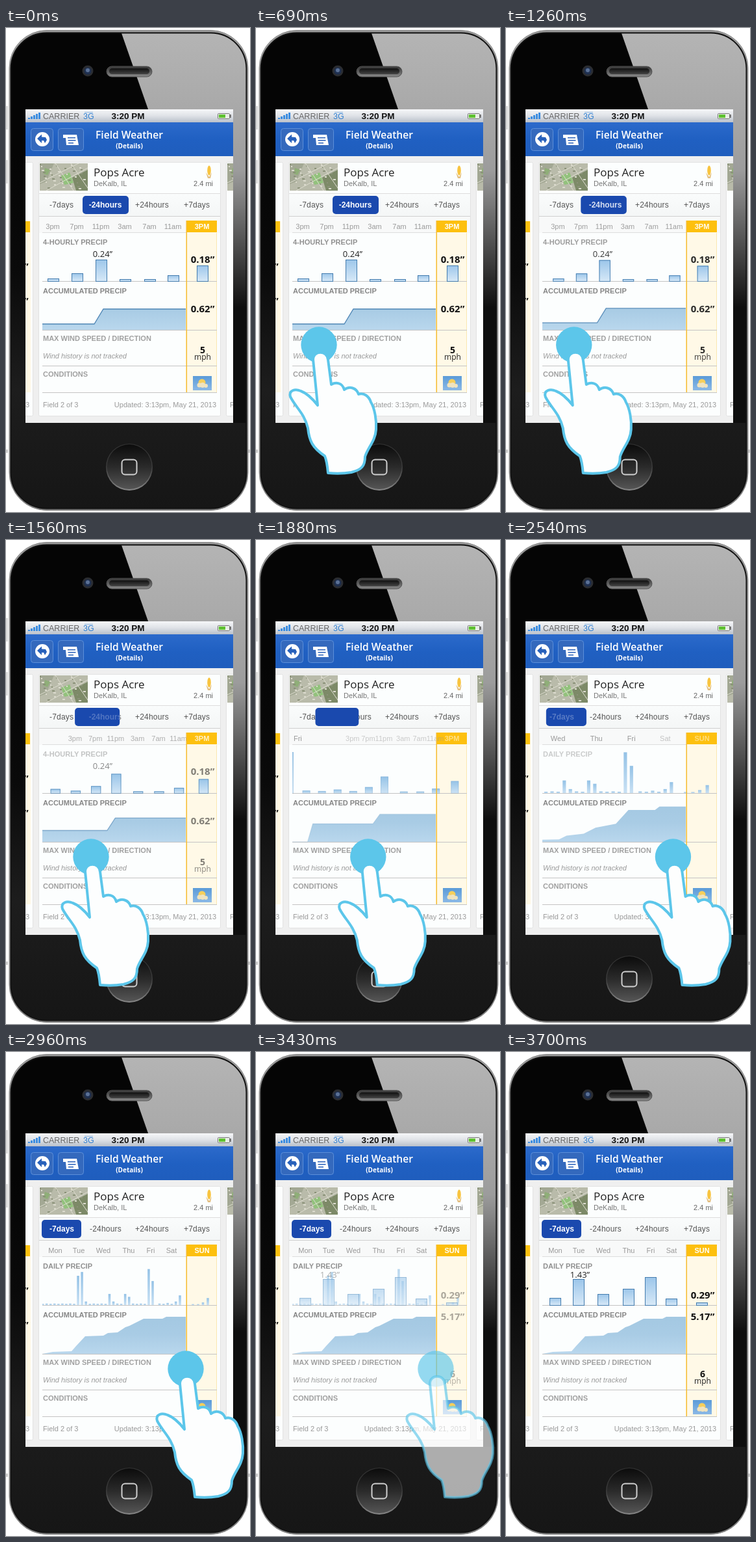
These frames come from a looping animation (376 px wide and 744 px high, 4.22 s). An HTML page with a canvas:

```html
<!DOCTYPE html>
<html lang="en">
<head>
<meta charset="utf-8">
<title>Field Weather</title>
<style>
html, body { margin: 0; width: 100%; height: 100%; overflow: hidden; background: #fff; }
canvas { display: block; width: 376px; height: 744px; }
</style>
</head>
<body>
<canvas id="stage" width="376" height="744"></canvas>
<script>
const ctx = document.getElementById('stage').getContext('2d');
const LOOP = 4220;
const SANS = '"Liberation Sans", Arial, sans-serif';
const OPEN = '"Open Sans", sans-serif';
const BLUE = '#1a49ae', GOLD = '#fdc00f', CYAN = '#5cc6ea';

const clamp = v => Math.max(0, Math.min(1, v));
const lerp = (a, b, k) => a + (b - a) * k;
const span = (t, from, to) => clamp((t - from) / (to - from));

function rect(x, y, w, h, fill) {
  ctx.fillStyle = fill;
  ctx.fillRect(x, y, w, h);
}
function rounded(x, y, w, h, r, fill, stroke, width = 1) {
  ctx.beginPath();
  ctx.roundRect(x, y, w, h, r);
  if (fill) { ctx.fillStyle = fill; ctx.fill(); }
  if (stroke) { ctx.strokeStyle = stroke; ctx.lineWidth = width; ctx.stroke(); }
}
function disc(x, y, r, fill) {
  ctx.beginPath();
  ctx.arc(x, y, r, 0, 7);
  ctx.fillStyle = fill;
  ctx.fill();
}
function poly(points, fill) {
  ctx.beginPath();
  points.forEach(([x, y]) => ctx.lineTo(x, y));
  ctx.fillStyle = fill;
  ctx.fill();
}
function vertical(y0, y1, ...stops) {
  const g = ctx.createLinearGradient(0, y0, 0, y1);
  stops.forEach((c, i) => g.addColorStop(i / (stops.length - 1), c));
  return g;
}
function text(str, x, y, font, color, align = 'left', spacing = 0) {
  ctx.font = font;
  ctx.fillStyle = color;
  ctx.textAlign = align;
  ctx.letterSpacing = spacing + 'px';
  ctx.fillText(str, x, y);
}
function faded(alpha, draw) {
  if (alpha <= 0) return;
  ctx.save();
  ctx.globalAlpha *= clamp(alpha);
  draw();
  ctx.restore();
}
function clipped(x, y, w, h, draw) {
  ctx.save();
  ctx.beginPath();
  ctx.rect(x, y, w, h);
  ctx.clip();
  draw();
  ctx.restore();
}

function phone() {
  rect(0, 0, 376, 744, '#fff');
  for (const y of [120, 203]) rect(0, y, 3, 36, '#dcdcdc');
  for (const x of [0, 373]) rect(x, 648, 3, 5, '#ccc');
  rounded(5, 3.5, 368, 738, 58, vertical(4, 741, '#999', '#ccc', '#aaa', '#777'), '#888');
  rounded(7.5, 7.5, 363, 731, 55, vertical(8, 738, '#050505', '#050505', '#0a0a0a', '#1d1d1d', '#161616'), '#111', 2);
  ctx.save();
  ctx.beginPath();
  ctx.roundRect(8.5, 8.5, 361, 729, 54);
  ctx.clip();
  poly([[178, 8], [219, 125], [350, 607], [376, 607], [376, 8]],
    vertical(8, 430, '#b4b4b4', '#aaa', '#9c9c9c', '#555', '#0e0e0e'));
  ctx.restore();

  disc(126, 66, 8.5, '#2b2d31');
  disc(126, 66, 5.5, '#1f3050');
  disc(126, 65, 3, '#5b7196');
  rounded(155, 59, 70, 16, 8, vertical(59, 75, '#333', '#8a8a8a'), '#555');
  rounded(159, 62, 62, 9, 4.5, vertical(62, 71, '#111', '#444'));

  disc(190, 675, 36, vertical(639, 711, '#333', '#3c3c3c', '#888'));
  disc(190, 674.5, 34.5, vertical(640, 709, '#0c0c0c', '#2a2a2a', '#555'));
  rounded(178.5, 663.5, 23, 23, 5, null, '#cfcfcf', 2);
}

function topBars() {
  rect(30, 125, 320, 20, vertical(125, 145, '#f6f7f9', '#dfe2e7', '#b9c0ca'));
  for (let i = 0; i < 5; i++) rect(34 + i * 4, 138 - i * 2, 3, 2 + i * 2, '#3c8de0');
  text('CARRIER', 57, 140, '12.5px ' + SANS, '#666');
  text('3G', 119, 140, '12.5px ' + SANS, '#2f7fd2');
  rect(121, 129, 13, 1, '#8fb9e4');
  text('3:20 PM', 188, 140, 'bold 13.5px ' + SANS, '#111', 'center');
  rounded(326.5, 131.5, 18, 8, 1, '#e9eee6', '#777');
  rect(328, 133, 10, 5, '#5fc131');
  rect(345, 133, 2, 5, '#777');

  rect(30, 145, 320, 52, vertical(145, 197, '#2c6acb', '#2060c2', '#1f5dbd'));
  for (const [x, w] of [[38.5, 34], [80.5, 39]]) rounded(x, 154.5, w, 34, 4, '#3469bd', '#5c8fd9');
  disc(56, 171, 11, '#fff');
  poly([[48, 170], [55, 163.5], [55, 167.5], [61, 168], [63, 172], [60, 177], [58, 173], [55, 173], [55, 177]], '#2861bb');
  poly([[88, 164], [109, 164], [112, 180], [93, 180], [92, 169], [88, 169]], '#fff');
  for (const y of [168, 172, 176]) rect(95 + (y - 168) / 8, y, y > 172 ? 8 : 12, 1.5, '#2a61b9');
  text('Field Weather', 190, 170, '600 15.6px ' + OPEN, '#fff', 'center');
  text('(Details)', 190, 185, 'bold 10px ' + OPEN, '#fff', 'center');
}

function mapThumb(x) {
  rect(x, 208, 74, 42, '#b9bbaa');
  poly([[x, 208], [x + 22, 208], [x + 10, 236], [x, 240]], '#a3a894');
  poly([[x + 50, 230], [x + 74, 218], [x + 74, 250], [x + 56, 250]], '#7d8a68');
  poly([[x + 33, 227], [x + 46, 222], [x + 52, 238], [x + 38, 241]], '#92c27c');
  poly([[x + 8, 215], [x + 16, 218], [x + 12, 226], [x + 6, 224]], '#8fae78');
  for (let i = 0; i < 38; i++)
    rect(x + i * 29 % 71, 209 + i * 17 % 38, 2 + i % 3, 2, i % 2 ? '#dcdbce' : '#8a9178');
  ctx.strokeStyle = '#dddccf';
  ctx.lineWidth = 1;
  ctx.beginPath();
  for (const [a, b, c, d] of [[0, 238, 60, 208], [24, 208, 52, 250], [48, 208, 74, 246], [10, 250, 74, 215]]) {
    ctx.moveTo(x + a, b);
    ctx.lineTo(x + c, d);
  }
  ctx.stroke();
}

function card() {
  rect(30, 197, 320, 410, '#efefef');
  for (const [x, w] of [[24, 18], [50, 281], [339, 20]])
    clipped(30, 197, 320, 410, () => rounded(x + .5, 206.5, w - 1, 390, 2, '#fcfefe', '#e2e2e2'));
  clipped(341, 208, 9, 42, () => mapThumb(341));
  clipped(52, 208, 74, 42, () => mapThumb(52));

  rect(30, 297, 8, 263, '#fff8e4');
  rect(30, 297, 7, 17, GOLD);
  text('”', 28, 372, 'bold 15px ' + OPEN, '#111');
  text('”', 28, 425, 'bold 15px ' + OPEN, '#111');
  text('3', 30, 583, '11px ' + SANS, '#999');
  clipped(339, 560, 11, 30, () => text('F', 345, 583, '11px ' + SANS, '#999'));

  text('Pops Acre', 135, 228, '17px ' + OPEN, '#222');
  text('DeKalb, IL', 135, 243, '11px ' + SANS, '#777');
  text('2.4 mi', 319, 243, '11px ' + SANS, '#666', 'right');
  ctx.beginPath();
  ctx.ellipse(313, 219, 2.8, 7.5, 0, 0, 7);
  ctx.fillStyle = '#f8c440';
  ctx.fill();
  poly([[308, 222], [313, 229], [317, 222], [315, 231], [311, 231]], '#e3bf80');

  rect(51, 254, 279, 36, vertical(254, 290, '#fafcfc', '#f4f6f6'));
  rect(51, 254, 279, 1, '#ddd');
  rect(51, 289, 279, 1, '#d0d0d0');
  rect(51, 290, 279, 25, '#f8f9f9');
  rect(56, 314, 222, 1, '#ddd');
  rect(278, 297, 47, 263, '#fff9e7');
  rect(324, 315, 1, 245, '#fbe7b0');
  rect(278, 296, 47, 18, GOLD);
  for (const y of [389, 464, 519, 560]) rect(56, y, 269, 1, '#c4c4c4');

  const label = 'bold 11px ' + SANS;
  text('ACCUMULATED PRECIP', 57, 408, label, '#858585');
  text('MAX WIND SPEED / DIRECTION', 57, 481, label, '#a0a0a0');
  text('Wind history is not tracked', 57, 508, 'italic 11px ' + SANS, '#999');
  text('CONDITIONS', 57, 536, label, '#a0a0a0');
  text('Field 2 of 3', 57, 583, '11px ' + SANS, '#999');
  text('Updated: 3:13pm, May 21, 2013', 324, 583, '11px ' + SANS, '#999', 'right');

  rect(288, 535, 29, 22, vertical(535, 557, '#5b9bd8', '#8bb9e6'));
  disc(302, 545, 5.5, '#f6cf5c');
  for (const [x, y, r] of [[298, 549, 3.5], [303, 549, 4], [308, 550, 3]]) disc(x, y, r, '#efe3bf');
}

function tabs(p) {
  const names = [['-7days', 67], ['-24hours', 129], ['+24hours', 199], ['+7days', 274]];
  for (const [name, x] of names) text(name, x, 276, '12px ' + SANS, '#555', 'left', .2);
  rounded(lerp(118, 55, p), 258, lerp(71, 61, p), 28, 5, BLUE);
  faded(1 - p * 4, () => text('-24hours', 153, 276, 'bold 12px ' + SANS, '#fff', 'center'));
  faded((p - .85) / .15, () => text('-7days', 86, 276, 'bold 12px ' + SANS, '#fff', 'center'));
}

// Four-hourly bars count back from 0, the last bar of Saturday; 1 to 4 belong to Sunday.
const peaks = {
  '-25': 100, '-24': 113, '-23': 12, '-17': 38, '-16': 12, '-13': 38, '-12': 28, '-7': 123, '-6': 82,
  '-3': 7, '-2': 4, '-1': 12, 0: 33, 1: 3, 2: 3, 3: 9, 4: 24
};
const sunday = [[184, 288], [222, 296], [258, 303.5], [303, 311]];

function barX(i, p) {
  if (i > 0) return lerp(...sunday[i - 1], p);
  return lerp(147 + 37 * i, i > -6 ? 268 + 6.3 * i : 226 + 6.05 * (i + 6), p);
}
function bar(x, h, w, outline) {
  const top = 389 - h;
  rect(x - w / 2, top, w, h, vertical(top, 389, '#94c2e6', '#c9e1f4'));
  if (outline > 0) faded(outline, () => {
    rect(x - w / 2, top, w, h, vertical(top, 389, '#9cc6ea', '#d6e8f7'));
    ctx.strokeStyle = '#447cae';
    ctx.lineWidth = 1;
    ctx.strokeRect(x - w / 2 + .5, top + .5, w - 1, h);
  });
}

const days = ['Mon', 'Tue', 'Wed', 'Thu', 'Fri', 'Sat'];
const dayX = [76, 112, 150, 189, 223, 255, 302];
const dayHeights = [11, 40, 17, 25, 43, 10, 4];

function precip(p, q) {
  clipped(56, 315, 269, 75, () => {
    faded(1 - q, () => {
      for (let i = -34; i <= 4; i++)
        bar(barX(i, p), (peaks[i] ?? 4 + (i * i) % 4) * lerp(1, .45, p), lerp(18, 3.6, p), 1 - p * 2);
    });
    faded(q, () => dayX.forEach((x, i) => bar(x, dayHeights[i], 18, 1)));
  });
}

// Each vertex: x and y at the 24-hour zoom, then x and y at the 7-day zoom.
const total = [
  [-1110, 700, 56, 464], [-1000, 700, 72, 461], [-800, 690, 101, 460], [-760, 690, 108, 452],
  [-670, 660, 122, 437], [-480, 660, 150, 436], [-430, 640, 157, 432], [-310, 620, 172, 431],
  [-240, 600, 184, 423], [-1, 561, 190, 421], [-3, 455, 212, 410], [136, 455, 241, 410],
  [150, 432, 247, 407], [277, 432, 277, 407]
];
function accumulated(p) {
  clipped(56, 390, 222, 75, () => {
    const points = total.map(([x0, y0, x1, y1]) => [lerp(x0, x1, p), Math.min(464, lerp(y0, y1, p))]);
    poly([...points, [277, 464], [points[0][0], 464]], vertical(405, 464, '#a3c8e2', '#a9cce5', '#b9d7ed'));
    faded(1 - p * 2, () => {
      ctx.beginPath();
      points.forEach(([x, y]) => ctx.lineTo(x, y));
      ctx.strokeStyle = '#4f86b5';
      ctx.lineWidth = 1.3;
      ctx.stroke();
    });
  });
}

function axis(p) {
  const font = '11px ' + SANS;
  faded(1 - p * 1.2, () => {
    ['3pm', '7pm', '11pm', '3am', '7am', '11am'].forEach((name, i) =>
      text(name, barX(i - 2, p) - 1, 309, font, '#999', 'center'));
    text('3PM', 302, 309, 'bold 11px ' + SANS, '#fff', 'center');
  });
  clipped(54, 296, 224, 20, () => days.forEach((name, i) => {
    const x = dayX[i] - (1 - p) * (274 + (4 - i) * 185);
    faded(i === 5 ? (p - .75) / .25 : 1, () => text(name, x, 309, font, '#999', 'center'));
  }));
  faded((p - .8) / .2, () => text('SUN', 302, 309, 'bold 11px ' + SANS, '#fff', 'center'));
  rect(277.5, 296, 1.5, 264, '#f5bb2d');
}

function readings(rain, rainY, sum, sumY, wind, peak, peakX, peakY) {
  const bold = 'bold 15px ' + OPEN;
  text(rain, 303, rainY, bold, '#111', 'center');
  text(sum, 303, sumY, bold, '#111', 'center');
  text(wind, 303, 500, 'bold 14px ' + OPEN, '#111', 'center');
  text('mph', 303, 510, '12px ' + OPEN, '#222', 'center');
  text(peak, peakX, peakY, '13px ' + OPEN, '#222', 'center');
}

const handShape = new Path2D(
  'M-9 23 C-9 8 13 8 14 23 L19 61 C26 57 36 58 39 69 C47 63 58 66 61 76 C69 73 77 79 80 88' +
  ' C86 98 89 116 88 130 C87 148 75 158 71 172 C71 186 66 192 50 196 C38 198 26 198 14 197 C13 186 12 178 9 171' +
  ' C-10 158 -15 148 -17 128 C-22 106 -36 96 -44 80 C-47 70 -37 67 -28 71 C-17 75 -9 84 -2 93 Z');

function hand(x) {
  ctx.save();
  ctx.translate(x, 487);
  disc(0, 0, 27.7, CYAN);
  ctx.fillStyle = '#fdfefe';
  ctx.strokeStyle = CYAN;
  ctx.lineWidth = 4;
  ctx.lineJoin = 'round';
  ctx.fill(handShape);
  ctx.stroke(handShape);
  ctx.restore();
}

function frame(t) {
  const drag = (1 - Math.cos(Math.PI * span(t, 1000, 2960))) / 2;
  const settle = span(t, 3290, 3690);

  phone();
  card();
  topBars();
  tabs(drag);
  accumulated(drag);
  precip(drag, settle);
  axis(drag);

  const label = 'bold 11px ' + SANS;
  faded(1 - drag * 2.5, () => {
    text('4-HOURLY PRECIP', 57, 333, label, '#909090');
    readings('0.18”', 361, '0.62”', 437, '5', '0.24”', 149, 352);
  });
  faded((drag - .8) / .2, () => text('DAILY PRECIP', 57, 333, label, '#909090'));
  faded(settle, () => readings('0.29”', 379, '5.17”', 412, '6', '1.43”', 114, 347));
  faded(span(t, 230, 670) * (1 - settle), () => hand(lerp(97, 277, drag)));
}

const start = performance.now();
function tick() {
  frame((performance.now() - start) % LOOP);
  requestAnimationFrame(tick);
}
tick();
</script>
</body>
</html>
```
